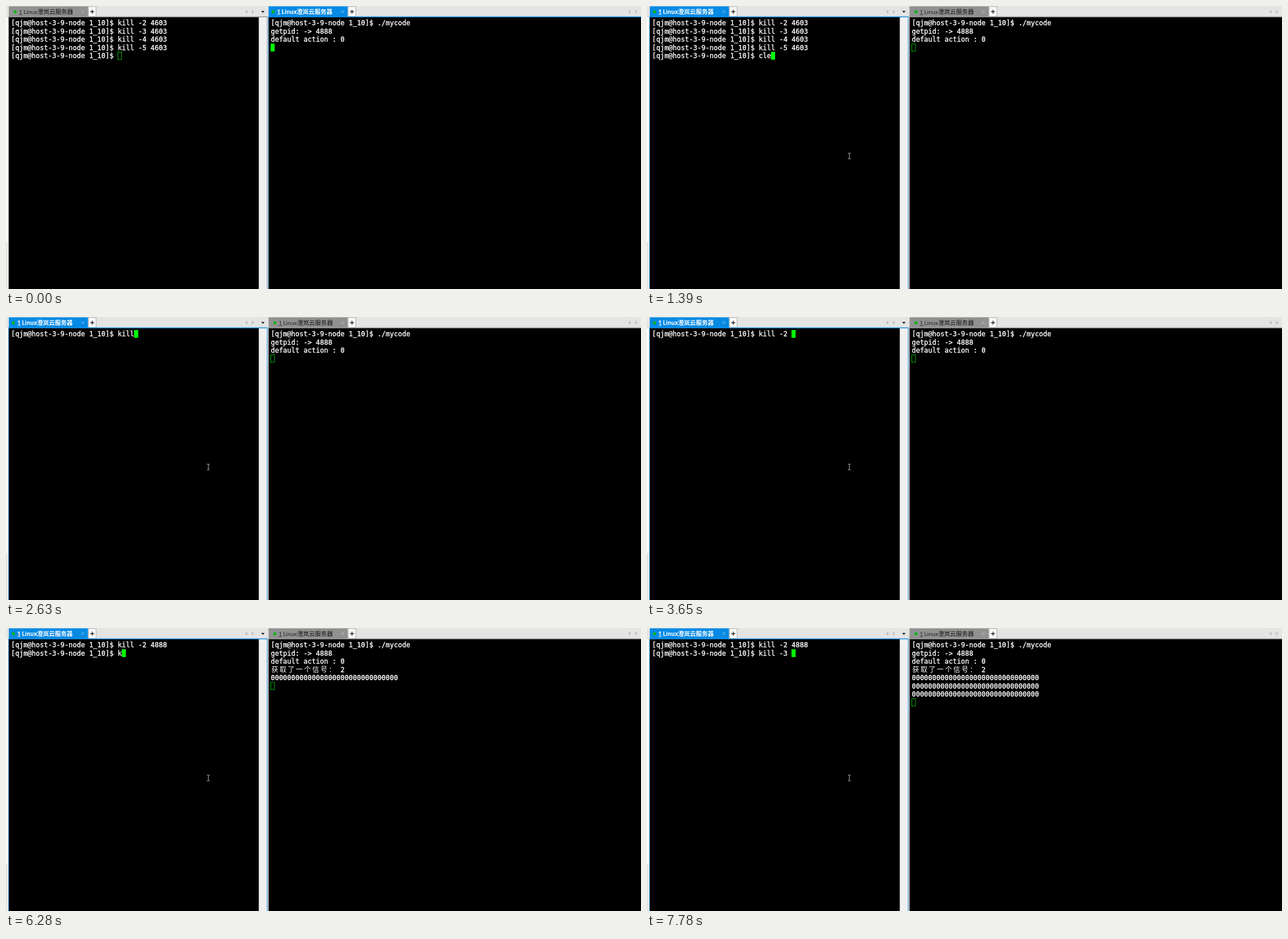
Recreate the animation shown at these times as an HTML page. Size 1121 by 500 pixels, loop 8000 ms.

```html
<!DOCTYPE html>
<html lang="zh">
<head>
<meta charset="utf-8">
<style>
  html, body { margin: 0; width: 100%; height: 100%; overflow: hidden; background: #000; }
  svg { display: block; width: 1121px; height: 500px; }
  text { white-space: pre; }
  .term {
    font: 12.043px "DejaVu Sans Mono", "Noto Sans CJK SC", monospace;
    fill: #fff; stroke: #fff; stroke-width: 0.35px;
  }
  .wide {
    font-family: "Noto Sans CJK SC", "Noto Sans CJK", sans-serif;
    letter-spacing: 2.457px; stroke: none;
  }
  .tab { font: 9.7px "Open Sans", "Noto Sans", sans-serif; }
  .tab.bold { font-weight: 700; }
  .tab .cjk { font-family: "Noto Sans CJK SC", "Noto Sans CJK", sans-serif; font-size: 10.5px; }
</style>
</head>
<body>
<svg id="stage" viewBox="0 0 1121 500"></svg>
<script>
const LOOP = 8000;
const CELL_W = 7.25, CELL_H = 14.5, TOP = 22.8, BASELINE = 11.6;
const BLUE = '#078ae4', GREY = '#919191', BAR = '#e4e4e4', GREEN = '#00ff00';
const PROMPT = '[qjm@host-3-9-node 1_10]$ ';
const FOCUS_AT = 720, CLEAR_AT = 1780, SIGNAL_AT = 5680;
const ZERO_TIMES = [5680, 6720, 7680];

// Each command is typed one character per listed time.
const TYPING = [
  { text: 'clear', times: [1190, 1290, 1390, 1480, 1630] },
  { text: 'kill -2 4888',
    times: [2110, 2310, 2480, 2630, 3020, 3150, 3380, 3650, 4230, 4840, 4980, 5530] },
  { text: 'kill -3 ', times: [6280, 6510, 6720, 6800, 7090, 7320, 7500, 7780] }
];
const MOUSE_TIMES = [160, 240, 320, 400, 490, 570];

const stage = document.getElementById('stage');

function add(parent, tag, attrs, content) {
  const node = document.createElementNS('http://www.w3.org/2000/svg', tag);
  for (const key in attrs) node.setAttribute(key, attrs[key]);
  if (content) node.textContent = content;
  return parent.appendChild(node);
}

const rect = (parent, x, y, width, height, fill) =>
  add(parent, 'rect', { x, y, width, height, fill });
const path = (parent, d, attrs) => add(parent, 'path', { d, fill: 'none', ...attrs });
const show = (node, visible) => node.setAttribute('display', visible ? 'inline' : 'none');
const passed = (times, t) => times.filter(at => t >= at).length;

function makeTabLabel(pane, active) {
  const group = add(pane, 'g', {});
  const shift = active ? -3 : 0;
  const ink = active ? '#fff' : '#111';
  const style = active ? 'tab bold' : 'tab';
  rect(group, 0, 0.6, 139.6, 18.6, active ? BLUE : GREY);
  add(group, 'circle', { cx: 11.2 + shift, cy: 10.3, r: 2.7, fill: '#0db514' });
  add(group, 'text', { class: style, x: 18 + shift, y: 13.5, fill: ink }, '1');
  rect(group, 18 + shift, 14.6, 6, 0.8, ink);
  const label = add(group, 'text', { class: style, x: 26 + shift, y: 13.5, fill: ink });
  add(label, 'tspan', {}, 'Linux');
  add(label, 'tspan', { class: 'cjk' }, '澄岚云服务器');
  path(group, 'M128 7.5l5 5m0-5l-5 5', { stroke: active ? '#8cc8f2' : '#bdbdbd', 'stroke-width': 0.9 });
}

function makePane(x, width, arrowsX, textWidth = width) {
  const pane = add(stage, 'g', { transform: `translate(${x} 0)` });
  rect(pane, 0, 0, width, 20, BAR);
  rect(pane, 0, 19.6, textWidth, 481, '#000');
  rect(pane, textWidth, 19.6, width - textWidth, 481, '#f0f0f0');
  rect(pane, 140.5, 1, 13.5, 17.5, '#fafafa').setAttribute('stroke', '#aaa');
  path(pane, 'M143.8 10h7M147.3 6.5v7', { stroke: '#222', 'stroke-width': 1.4 });
  path(pane, `M${arrowsX} 6.5v7l-4-3.5zM${arrowsX + 8} 6.5v7l4-3.5z`, { fill: '#bcbcbc' });

  const [inactive, active] = [false, true].map(focused => {
    const group = add(pane, 'g', {});
    const color = focused ? BLUE : '#8f8f8f';
    makeTabLabel(group, focused);
    rect(group, -0.8, 18.5, width + 0.8, 1.4, color);
    rect(group, -0.8, 18.5, 0.9, 482, color);
    rect(group, width - 0.4, 18.5, 0.9, 482, color);
    return group;
  });
  return focused => { show(active, focused); show(inactive, !focused); };
}

function makeTerminal(x, rows) {
  const lines = Array.from({ length: rows }, (_, row) =>
    add(stage, 'text', { class: 'term', x, y: TOP + row * CELL_H + BASELINE }));
  const cursor = add(stage, 'rect', {});
  return {
    draw(content, focused) {
      lines.forEach((line, i) => {
        const value = content[i] || '';
        if (line.textContent !== value) line.textContent = value;
      });
      const row = content.length - 1;
      const inset = focused ? 0 : 0.4;
      const box = {
        x: x - 0.35 + content[row].length * CELL_W + inset,
        y: TOP + row * CELL_H + 0.2 + inset,
        width: CELL_W - 2 * inset,
        height: 13.8 - 2 * inset,
        fill: focused ? GREEN : 'none',
        stroke: focused ? 'none' : '#00e800',
        'stroke-width': 0.8
      };
      for (const key in box) cursor.setAttribute(key, box[key]);
    }
  };
}

rect(stage, 0, 0, 1121, 500, BAR);
rect(stage, 0, 20, 2, 397, '#fff');
rect(stage, 2, 20, 2, 480, '#ececec');
const focusLeft = makePane(5, 456, 421, 441.5);
const focusRight = makePane(463.5, 660, 639);
path(stage, 'M450.5 8.8h6l-3 3.2z', { fill: '#111' });

const left = makeTerminal(9, 5);
const right = makeTerminal(467.4, 8);
const signalLabel = add(stage, 'text',
  { class: 'term wide', x: 468.4, y: TOP + 3 * CELL_H + BASELINE }, '获取了一个信号：');
const mouse = path(stage, 'M-2.5 -5h2l.5 .5l.5 -.5h2M0 -4.5v9M-2.5 5h2l.5 -.5l.5 .5h2',
  { stroke: '#d8d8d8', 'stroke-width': 0.9 });

function leftLines(t) {
  const typed = TYPING.map(({ text, times }) => PROMPT + text.slice(0, passed(times, t)));
  if (t < CLEAR_AT) return [2, 3, 4, 5].map(n => `${PROMPT}kill -${n} 4603`).concat(typed[0]);
  return t < SIGNAL_AT ? [typed[1]] : [typed[1], typed[2]];
}

function rightLines(t) {
  const lines = [PROMPT + './mycode', 'getpid: -> 4888', 'default action : 0'];
  if (t >= SIGNAL_AT) lines.push(' '.repeat(17) + '2');
  return lines.concat(Array(passed(ZERO_TIMES, t)).fill('0'.repeat(31)), '');
}

function moveMouse(t) {
  const step = passed(MOUSE_TIMES, t);
  show(mouse, step > 0);
  const remain = (1 - Math.max(0, step - 1) / 5) ** 1.6;
  mouse.setAttribute('transform', `translate(${357.2 + 432 * remain} ${265 + 230 * remain})`);
}

function render(t) {
  const leftFocused = t >= FOCUS_AT;
  focusLeft(leftFocused);
  focusRight(!leftFocused);
  left.draw(leftLines(t), leftFocused);
  right.draw(rightLines(t), !leftFocused);
  show(signalLabel, t >= SIGNAL_AT);
  moveMouse(t);
}

const start = performance.now();
function tick() {
  render((performance.now() - start) % LOOP);
  requestAnimationFrame(tick);
}
render(0);
requestAnimationFrame(tick);
</script>
</body>
</html>
```
